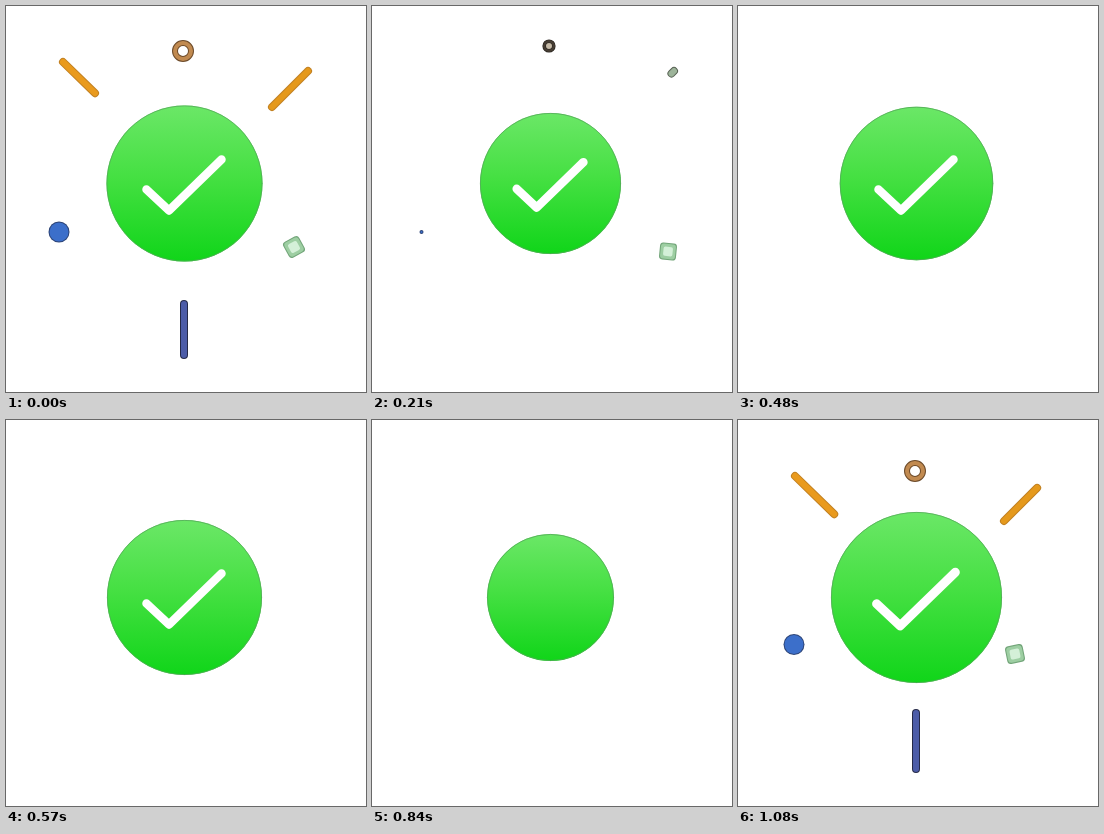
Recreate the animation shown at these times as an HTML page with a canvas. Size 360 px wide and 386 px high, loop 1110 ms.

```html
<!DOCTYPE html>
<html lang="en">
<head>
<meta charset="utf-8">
<title>Success check</title>
<style>
html, body { margin: 0; width: 100%; height: 100%; overflow: hidden; background: #fff; }
canvas { display: block; }
</style>
</head>
<body>
<canvas id="stage" width="360" height="386"></canvas>
<script>
const c = document.getElementById('stage').getContext('2d');
const LOOP = 1110, STEP = 30, PHASE = 270;
const CX = 178.5, CY = 177.5;
const start = performance.now();
c.lineCap = c.lineJoin = 'round';

// Linear interpolation through [time, value] pairs.
function at(t, ...keys) {
  if (t <= keys[0][0]) return keys[0][1];
  for (let i = 1; i < keys.length; i++) {
    const [t0, a] = keys[i - 1], [t1, b] = keys[i];
    if (t <= t1) return a + (b - a) * (t - t0) / (t1 - t0);
  }
  return keys[keys.length - 1][1];
}

function stroke(color, width) {
  c.strokeStyle = color;
  c.lineWidth = width;
  c.stroke();
}

function circle(x, y, r) {
  c.beginPath();
  c.arc(x, y, Math.max(r, 0), 0, 7);
}

// Part of a segment, from fraction a to fraction b, with a darker rim.
function bar(x0, y0, x1, y1, a, b, rim, fill, width) {
  if (b <= a) return;
  const point = k => [x0 + (x1 - x0) * k, y0 + (y1 - y0) * k];
  c.beginPath();
  c.moveTo(...point(a));
  c.lineTo(...point(b));
  stroke(rim, width);
  stroke(fill, width - 2);
}

function particles(t) {
  if (t < 30 || t > 640) return;
  bar(97, 95, 57, 56, at(t, [240, .02], [270, .2], [360, .65], [450, 1]),
    at(t, [60, 0], [120, .7], [180, 1]), '#c18022', '#e99a1d', 8);
  bar(266, 101, 302, 65, at(t, [270, 0], [360, .4], [480, .93], [510, 1]),
    at(t, [100, 0], [120, .03], [240, .92], [270, 1]),
    t > 440 ? '#566052' : '#c18022', t > 440 ? '#9db49a' : '#e5991c', 8);
  bar(178, 293, 178, 349, at(t, [240, 0], [270, .09], [360, .55], [450, 1]),
    at(t, [60, 0], [120, .37], [240, 1]), '#252a48', t < 180 ? '#4a78c0' : '#4c5ca8', 8);

  const dot = at(t, [60, 10], [240, 10.5], [330, 10.5], [480, 2], [510, 0]);
  if (dot > 0) {
    circle(at(t, [60, 108], [120, 71], [240, 56], [270, 53], [330, 51], [480, 49.5]),
      at(t, [60, 205], [120, 218], [240, 224.5], [270, 226]), dot);
    c.fillStyle = '#2d4476';
    c.fill();
    circle(at(t, [60, 108], [120, 71], [240, 56], [270, 53], [330, 51], [480, 49.5]),
      at(t, [60, 205], [120, 218], [240, 224.5], [270, 226]), dot - 1);
    c.fillStyle = '#3c6fca';
    c.fill();
  }

  const ring = at(t, [270, 1], [360, 1], [480, .6], [570, 0]);
  if (ring > 0) {
    circle(177, at(t, [60, 115], [120, 83], [240, 51], [270, 45], [360, 41.5], [480, 40]), 8 * ring);
    c.fillStyle = t > 420 ? '#c5b9a6' : '#fff';
    c.fill();
    stroke(t > 420 ? '#28241f' : '#6d4b2a', 6 * ring);
    stroke(t > 420 ? '#463d33' : t < 180 ? '#ce8b32' : '#c18a50', 4 * ring);
  }

  const size = at(t, [270, 18], [480, 17], [600, 0]);
  if (size > 0) {
    c.save();
    c.translate(at(t, [120, 235], [240, 277], [270, 288], [480, 296]),
      at(t, [120, 212], [240, 234], [270, 241], [480, 245.5]));
    c.rotate(at(t, [120, -1.4], [240, -.2 - Math.PI / 2], [270, -.5 - Math.PI / 2], [480, .1 - Math.PI / 2]));
    for (const [k, color] of [[1, '#72a579'], [.88, '#9dcea2'], [.55, '#d4f0d8']]) {
      const s = size * k;
      c.beginPath();
      c.roundRect(-s / 2, -s / 2, s, s, s * .2);
      c.fillStyle = color;
      c.fill();
    }
    c.restore();
  }
}

function disc(r, alpha) {
  const g = c.createLinearGradient(0, CY - r, 0, CY + r);
  g.addColorStop(0, '#6be767');
  g.addColorStop(.45, '#46e043');
  g.addColorStop(1, '#10d519');
  c.globalAlpha = alpha;
  circle(CX, CY, r);
  c.fillStyle = g;
  c.fill();
  circle(CX, CY, r - .4);
  stroke('#55a95a', .8);
  c.globalAlpha = 1;
}

function check(scale, trim, color, width) {
  if (trim <= 0) return;
  const pts = [[-38, 6], [-15.5, 27], [37, -24]].map(([x, y]) => [CX + x * scale, CY + y * scale]);
  c.beginPath();
  c.moveTo(...pts[0]);
  let left = trim * 104;
  [31, 73].forEach((len, i) => {
    const k = Math.min(1, left / len), [x0, y0] = pts[i], [x1, y1] = pts[i + 1];
    if (k > 0) c.lineTo(x0 + (x1 - x0) * k, y0 + (y1 - y0) * k);
    left -= len;
  });
  stroke(color, width);
}

// Time zero is the moment the green disc is smallest.
function draw(t) {
  c.fillStyle = '#fff';
  c.fillRect(0, 0, 360, 386);
  particles(t);
  const idle = t >= 870;
  if (idle) {
    const r = at(t, [990, 79], [1050, 71], [1110, 64]);
    circle(CX - .5, CY, r - 3);
    stroke('#a9a9a9', 6.5);
    stroke('#c6c6c6', 4.5);
    const fade = at(t, [1000, 1], [1070, 0]);
    c.globalAlpha = fade;
    check(.92, 1, '#b0b0b0', 6.5);
    check(.92, 1, '#c6c6c6', 4.5);
    disc(r, at(t, [1000, 0], [1080, 1]));
  } else {
    disc(at(t, [0, 63.5], [60, 77], [120, 89], [180, 89.5], [240, 85.5], [270, 78],
      [330, 73], [400, 69.5], [480, 70.5], [600, 74], [750, 76.7], [840, 77.5]), 1);
    check(at(t, [60, 1.1], [120, 1.1], [240, 1.05], [270, 1], [390, .89], [480, .89], [600, .95], [750, 1]),
      at(t, [30, 0], [120, .75], [180, 1]), '#fff', at(t, [120, 11], [240, 9], [270, 8.5]));
  }
}

function frame(now) {
  const step = Math.floor(Math.max(0, now - start) / STEP + .001) * STEP;
  draw((step + PHASE) % LOOP);
  requestAnimationFrame(frame);
}
frame(start);
</script>
</body>
</html>
```
